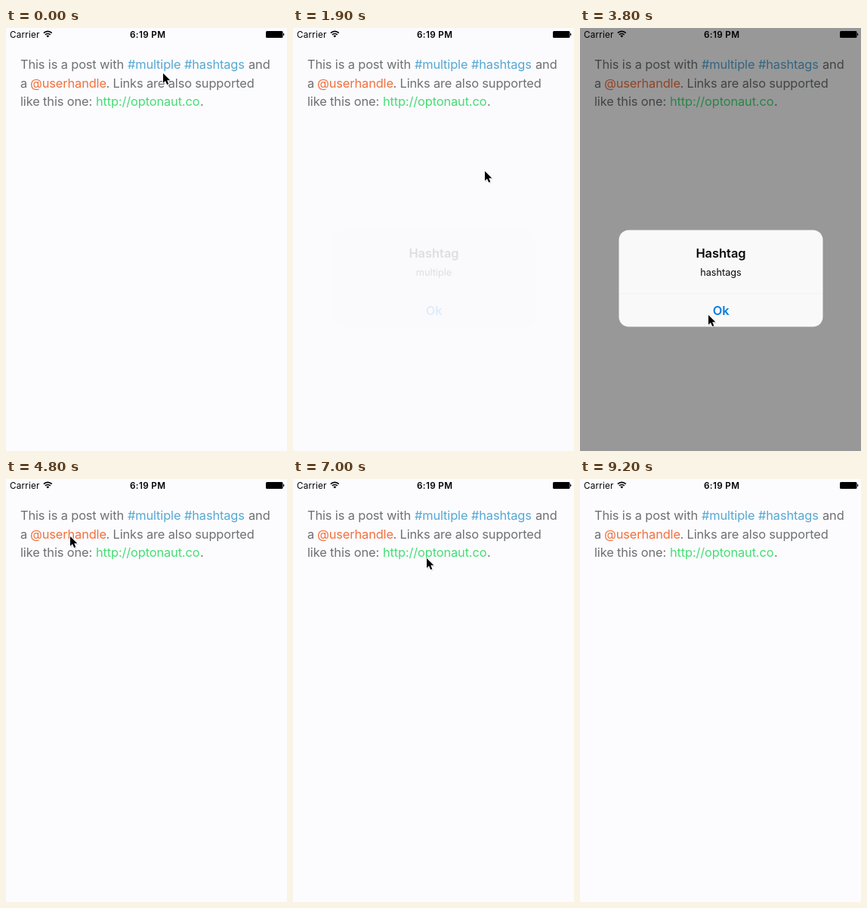
These frames come from a looping animation (372 by 560 pixels, 9300 ms). An HTML page:

```html
<!DOCTYPE html>
<html lang="en">
<head>
<meta charset="utf-8">
<title>Tappable text</title>
<style>
  html, body { margin: 0; width: 100%; height: 100%; overflow: hidden; background: #fcfcff; }
  svg { display: block; width: 372px; height: 560px; font-family: Inter, Roboto, sans-serif; }
  .post { font-size: 16.4px; letter-spacing: -.13px; fill: #6e7070; }
  .tag { fill: #56a8d2; }
  .handle { fill: #f2703c; }
  .link { fill: #46dc74; }
  .status { font-size: 11.7px; letter-spacing: .2px; }
  .status .bold { letter-spacing: .35px; }
  .bold { font-weight: 600; }
  .alert { text-anchor: middle; font-size: 16.4px; fill: #080808; }
  .alert .message { font-size: 12.7px; }
  .alert .ok { fill: #087ee0; letter-spacing: -.3px; }
</style>
</head>
<body>
<svg viewBox="0 0 372 560">
  <rect width="372" height="560" fill="#fcfcff"/>

  <g class="post">
    <text x="19" y="54.3">This is a post with</text>
    <text x="161" y="54.3" class="tag">#multiple</text>
    <text x="236" y="54.3" class="tag">#hashtags</text>
    <text x="321" y="54.3">and</text>
    <text x="19" y="78.6">a</text>
    <text x="32" y="78.6" class="handle">@userhandle</text>
    <text x="132.5" y="78.6">. Links are also supported</text>
    <text x="19" y="102.9">like this one:</text>
    <text x="119" y="102.9" class="link">http://optonaut.co</text>
    <text x="257" y="102.9">.</text>
  </g>

  <rect id="scrim" width="372" height="560" opacity="0"/>

  <g class="status">
    <text x="5" y="12.5">Carrier</text>
    <text x="164" y="12.5" class="bold">6:19 PM</text>
    <g fill="none" stroke="#000" stroke-width="1.7">
      <path d="M49.9 6.7a7.6 7.6 0 0 1 10.8 0"/>
      <path d="M51.9 8.9a4.8 4.8 0 0 1 6.8 0"/>
    </g>
    <path d="M53.4 10.5a2.7 2.7 0 0 1 3.8 0l-1.9 2z"/>
    <rect x="344" y="4" width="22.5" height="9" rx="1.5"/>
    <path d="M367 6.5q2.8 2 0 4z"/>
  </g>

  <g class="alert" id="alert" opacity="0">
    <rect x="51.5" y="267.5" width="270" height="128" rx="13" fill="#f9f9fa"/>
    <path d="M52 351.5h269" stroke="#f2f2f3"/>
    <text class="bold" id="title" x="186.5" y="303.7"></text>
    <text class="message" id="message" x="186.5" y="327.6"></text>
    <text class="bold ok" x="186.5" y="380">Ok</text>
  </g>

  <g id="cursor">
    <path d="M1 2v12.8l3.2-2.9 2.1 4.8 2.4-1-2.1-4.7h4.3z" opacity=".15"/>
    <path d="M0 0v12.8l3-2.8 2.2 5 2.1-.9-2.1-4.8h4.1z" stroke="#fff" stroke-width="1.5"
      stroke-linejoin="round" paint-order="stroke"/>
  </g>
</svg>
<script>
const LOOP = 9300, STEP = 100, FADE = 380, SETTLE = 250, DIM = .4;

// Each scene taps a word, then closes the alert that opens
const SCENES = [
  { title: 'Hashtag', message: 'multiple', word: [300, 208, 60], close: [1600, 225, 370] },
  { title: 'Hashtag', message: 'hashtags', word: [2400, 276, 52], close: [3900, 170, 380] },
  { title: 'Mention', message: 'userhandle', word: [4800, 85, 76], close: [5900, 153, 358] },
  { title: 'URL', message: 'http://optonaut.co', word: [7200, 177, 105], close: [8050, 165, 348] }
];
const EXIT = [9150, 250, 580];
const TAPS = [...SCENES.flatMap(s => [s.word, s.close]), EXIT];

const $ = id => document.getElementById(id);
const clamp = v => Math.min(1, Math.max(0, v));
const smooth = v => v * v * (3 - 2 * v);
const ease = (t, from, to) => smooth(clamp((t - from) / (to - from)));

function drawCursor(t) {
  let [, x, y] = TAPS[0];
  TAPS.slice(1).forEach(([tap, nextX, nextY], i) => {
    const k = ease(t, TAPS[i][0], tap - SETTLE);
    x += (nextX - x) * k;
    y += (nextY - y) * k;
  });
  $('cursor').setAttribute('transform', `translate(${x} ${y})`);
}

function drawAlert(t) {
  const scene = SCENES.findLast(s => t >= s.word[0]) || SCENES[0];
  const show = scene.word[0], hide = scene.close[0];
  const enter = ease(t, show, show + FADE);
  const alpha = enter * (1 - ease(t, hide, hide + FADE));
  $('title').textContent = scene.title;
  $('message').textContent = scene.message;
  $('alert').setAttribute('opacity', alpha);
  $('alert').setAttribute('transform',
    `translate(186.5 331.5) scale(${1.17 - .17 * enter}) translate(-186.5 -331.5)`);
  $('scrim').setAttribute('opacity', DIM * alpha ** 2);
}

function draw() {
  const t = Math.floor(performance.now() % LOOP / STEP) * STEP;
  drawAlert(t);
  drawCursor(t);
  requestAnimationFrame(draw);
}
draw();
</script>
</body>
</html>
```
